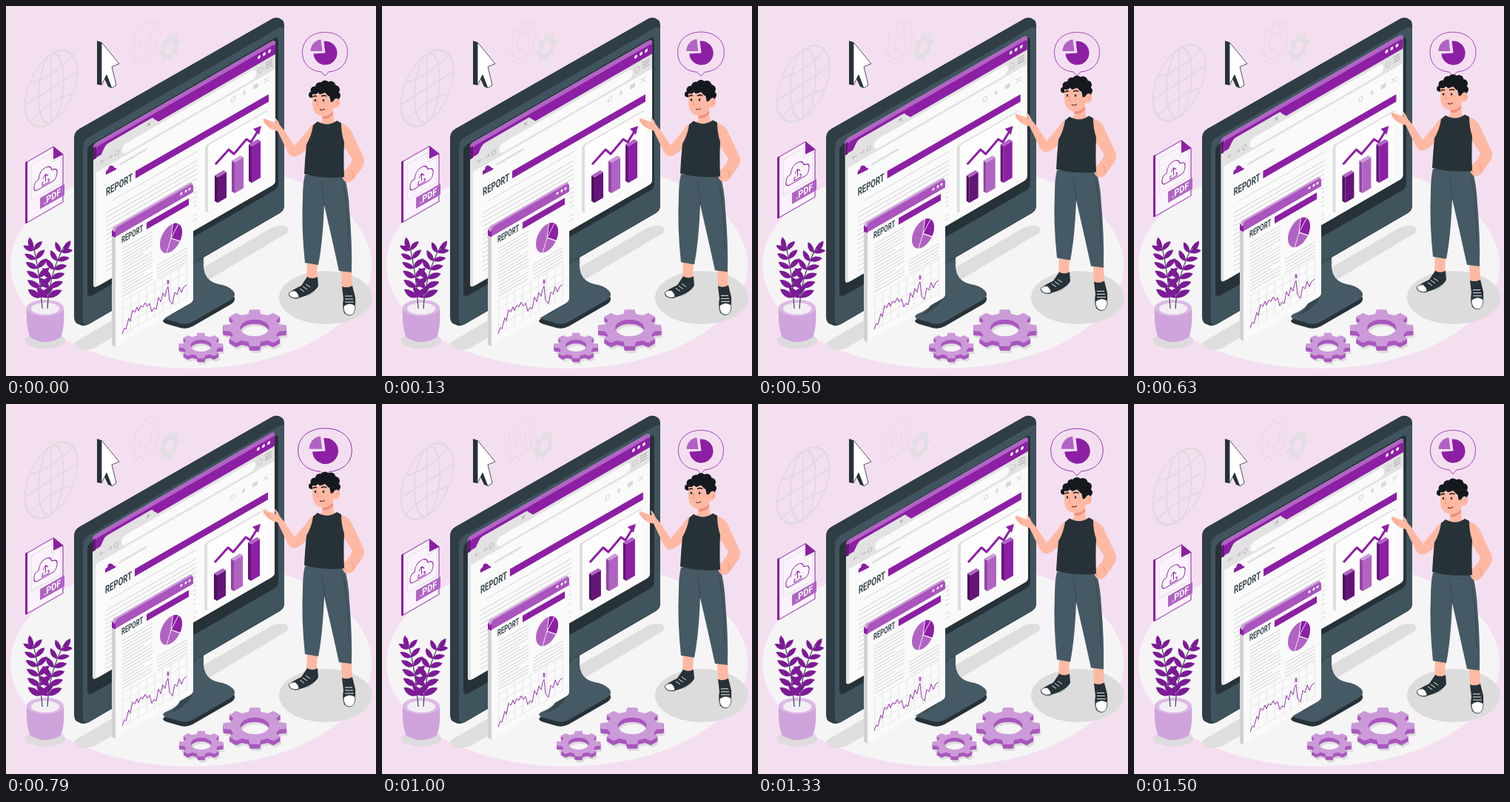
An HTML page with a canvas that plays this animation: 500x500 px, repeating every 1540 ms.

```html
<!DOCTYPE html>
<html lang="en">
<head>
<meta charset="utf-8">
<title>Report illustration</title>
<style>
html, body { margin: 0; width: 100%; height: 100%; overflow: hidden; background: #f4dff1; }
canvas { display: block; }
</style>
</head>
<body>
<canvas id="stage" width="500" height="500"></canvas>
<script>
const ctx = document.getElementById('stage').getContext('2d');
const LOOP = 1540, SLOPE = 0.577, TAU = Math.PI * 2;
const PURPLE = '#8c1fa4', MID = '#b163c4', LIGHT = '#cc9ad9', DEEP = '#651579';
const INK = '#263238', SLATE = '#37474f', STEEL = '#455a64';
const SKIN = '#ffb9a3', BLUSH = '#f08f7c', GREY = '#dcdcdc', PAPER = '#fafafa';

function fill(d, color) { ctx.fillStyle = color; ctx.fill(new Path2D(d)); }

function line(d, color, width = 1) {
  ctx.strokeStyle = color;
  ctx.lineWidth = width;
  ctx.stroke(new Path2D(d));
}

function oval(x, y, rx, ry, color, stroke) {
  ctx.beginPath();
  ctx.ellipse(x, y, rx, ry, 0, 0, TAU);
  if (color) { ctx.fillStyle = color; ctx.fill(); }
  if (stroke) { ctx.strokeStyle = stroke; ctx.stroke(); }
}

function box(x0, x1, y0, y1, color, r = 0) {
  ctx.fillStyle = color;
  ctx.beginPath();
  ctx.roundRect(x0, y0, x1 - x0, y1 - y0, r);
  ctx.fill();
}

function group(dx, dy, draw) {
  ctx.save();
  ctx.translate(dx, dy);
  draw();
  ctx.restore();
}

// Upright isometric wall whose heights are measured at x = x0.
function wall(x0, draw) {
  ctx.save();
  ctx.transform(1, -SLOPE, 0, 1, 0, SLOPE * x0);
  draw();
  ctx.restore();
}

function label(text, x, y, size, narrow, color) {
  ctx.save();
  ctx.translate(x, y);
  ctx.scale(narrow, 1);
  ctx.font = `bold ${size}px Roboto, sans-serif`;
  ctx.fillStyle = color;
  ctx.fillText(text, 0, 0);
  ctx.restore();
}

function textRows(x0, x1, from, to, step, color) {
  for (let y = from, i = 0; y <= to; y += step, i++)
    box(x0, i % 6 === 5 ? x1 - (x1 - x0) * 0.3 : x1, y, y + 1.2, color);
}

function slice(x, y, r, from, to, color) {
  ctx.fillStyle = color;
  ctx.beginPath();
  ctx.moveTo(x, y);
  ctx.arc(x, y, r, from * TAU, to * TAU);
  ctx.fill();
}

function gearPath(r, teeth, hole) {
  const path = new Path2D(), step = TAU / teeth;
  for (let i = 0; i < teeth; i++) {
    for (const [a, k] of [[-0.31, 0.79], [-0.2, 1], [0.2, 1], [0.31, 0.79]]) {
      const angle = (i + a) * step;
      path.lineTo(Math.cos(angle) * r * k, Math.sin(angle) * r * k);
    }
  }
  path.closePath();
  path.moveTo(hole, 0);
  path.arc(0, 0, hole, 0, TAU);
  return path;
}

const bigGear = gearPath(43, 8, 19.5), smallGear = gearPath(30, 8, 14);
const outlineGear = gearPath(21, 8, 8), paleGear = gearPath(15, 8, 6);

function floorGear(path, x, y, depth) {
  const layer = (dx, dy, color) => group(x + dx, y + dy, () => {
    ctx.scale(1, 0.58);
    ctx.fillStyle = color;
    ctx.fill(path, 'evenodd');
  });
  layer(2, depth + 3, GREY);
  for (let k = depth; k > 0; k--) layer(0, k, '#a957be');
  layer(0, 0, LIGHT);
}

function wallGears() {
  ctx.save();
  ctx.translate(189, 48);
  ctx.transform(0.95, -0.6, 0, 1.25, 0, 0);
  ctx.strokeStyle = '#e4d8e3';
  ctx.lineWidth = 1;
  ctx.stroke(outlineGear);
  ctx.restore();
  ctx.save();
  ctx.translate(221, 56);
  ctx.transform(0.95, -0.55, 0, 1.2, 0, 0);
  ctx.fillStyle = '#e3dee4';
  ctx.fill(paleGear, 'evenodd');
  ctx.restore();
}

function globe() {
  ctx.save();
  ctx.translate(61, 111.5);
  ctx.transform(1, -0.64, 0, 1.3, 0, 0);
  ctx.lineWidth = 2;
  const color = '#e0dadf';
  oval(0, 0, 35.5, 35.5, null, color);
  oval(0, 0, 17, 35.5, null, color);
  line('M0 -35V35M-35 0H35M-29 -20Q0 -11 29 -20M-29 20Q0 11 29 20', color, 1.8);
  ctx.restore();
}

function cursor() {
  const arrow = 'M129 49L153 78L143 82L149 107L143 111L136 93L129 107Z';
  fill('M123 47L129 49V107L123 106ZM131 94L136 92L143 111L138 109Z', INK);
  fill(arrow, '#fff');
  line(arrow, INK, 0.8);
}

function monitor() {
  const base = 'M216 416Q206 421 222 425L236 429Q244 431 252 427L304 397Q313 391 306 384Q300 378 288 376Q268 372 267 352V325L238 345V395Q236 408 216 416Z';
  group(0, 6, () => fill(base, INK));
  fill(base, STEEL);
  fill('M238 345L253 337V384Q252 405 222 418Q237 405 238 390Z', SLATE);
  fill('M92 178Q92 170 99 166L360 17Q367 14 372 18Q376 20 376 26V270Q376 276 370 280L112 430Q104 434 98 430Q92 428 92 420Z', '#2f3d45');
  fill('M104 190Q104 182 111 178L368 30Q376 26 376 32V268Q376 275 370 279L112 429Q104 433 104 424Z', '#40545e');
  fill('M110 196Q110 190 115 187L362 44Q368 40 368 47V240Q368 246 363 249L117 391Q110 394 110 388Z', INK);
}

function browser() {
  wall(118, () => {
    box(118, 364, 187, 382, '#e3e3e3', 5);
    box(122, 364, 200, 382, PAPER, 4);
    box(118, 364, 187, 200, MID, [4, 4, 0, 0]);
    box(122, 364, 193, 208, PURPLE, [3, 3, 0, 0]);
    box(118, 122, 192, 208, DEEP);
    box(122, 364, 207, 227, '#e2e2e2');
    fill('M128 208L133 200Q135 197 138 197H196Q199 197 200 200L207 208Z', '#e2e2e2');
    box(157, 338, 211, 224, PAPER, 6);
    for (const x of [342, 349, 356]) oval(x, 198.3, 2, 2.2, '#fff');
    line('M191 201L195 205M195 201L191 205', '#a8a8a8');
    line('M134 217H128L130 215M128 217L130 219M138 217H144L142 215M144 217L142 219', '#bbb');
    oval(150, 217, 2.6, 3, null, '#bbb');
    oval(344, 217, 3, 3.4, null, '#c4c4c4');
    line('M351 212H360M351 215.5H360M351 219H360', '#b0b0b0', 1.4);
  });
}

function bar(x, top, bottom, front, side, cap) {
  fill(`M${x} ${top}l4 2.5V${bottom}l-4 -2.5Z`, side);
  fill(`M${x + 4} ${top + 2.5}l12 -7V${bottom - 7}l-12 7Z`, front);
  fill(`M${x} ${top}l12 -7l4 2.5l-12 7Z`, cap);
}

function content() {
  fill('M135 228Q134 222 138 221Q139 214 144 216Q146 217 147 219Q150 218 149 221Z', PURPLE);
  wall(118, () => {
    box(153, 191, 233.5, 236.5, '#dedede', 1.5);
    box(175, 355, 256, 266, PURPLE);
    label('REPORT', 135, 266.5, 14.5, 0.66, SLATE);
    textRows(142, 258, 277, 282, 6, '#d9d9d9');
    textRows(135, 258, 289, 369, 6, '#d9d9d9');
    ctx.lineWidth = 1;
    oval(307, 235, 2.6, 3, null, '#d4d4d4');
    oval(322, 235, 1.8, 3, '#d9d9d9');
    box(334, 341, 232, 238, '#d9d9d9', 1);
    line('M349 232L355 238M355 232L349 238', '#d4d4d4');
    box(269, 354, 276, 368, '#dedede', 4);
    box(273, 354, 278, 368, '#fdfdfd', 3);
  });
  bar(282, 229, 266, DEEP, '#4f0f60', MID);
  bar(305, 209, 253, MID, '#9145a4', LIGHT);
  bar(328, 187, 239, PURPLE, DEEP, MID);
  line('M283 214L301 194L308 200L325 180L331 184L341 168', PURPLE, 3);
  fill('M334 166L345 162L342 174Z', PURPLE);
}

const TREND = 'M157 443L160 435L162 437L166 422L168 426L171 411L174 414L177 407L179 412L182 405L185 407L188 401L191 406L194 402L197 413L200 408L203 410L206 394L209 400L212 388L215 393L217 383L219 379L221 398L225 403L228 387L231 390L234 380L237 387L240 380L244 377';

function reportPage() {
  wall(148, () => {
    fill('M143 300Q143 295 148 296V461L143 455Z', '#d2d2d2');
    box(148, 253, 298, 460, PAPER, 4);
    fill('M143 300L148 304V313L143 308Z', PURPLE);
    box(145, 252, 297, 304, LIGHT, [4, 4, 0, 0]);
    box(148, 253, 300, 312, '#aa54be', [4, 4, 0, 0]);
    for (const x of [237, 243, 248]) oval(x, 305, 1.5, 1.8, '#fff');
    box(190, 247, 317, 326, PURPLE);
    label('REPORT', 156, 325.5, 12.5, 0.62, SLATE);
    textRows(157, 198, 333, 400, 4.6, '#d8d8d8');
    textRows(204, 245, 382, 401, 4.6, '#d8d8d8');
    ctx.save();
    ctx.translate(223, 357);
    ctx.scale(1, 1.22);
    slice(0, 0, 15, 0, 1, MID);
    slice(0, 0, 15, -0.22, 0.1, PURPLE);
    line('M0 0L2.5 -15M0 0L10 -11M0 0L12 9M0 0L-6 14', PAPER, 0.9);
    ctx.restore();
    for (let i = 0; i <= 8; i++) box(157 + i * 10.9, 157.7 + i * 10.9, 403, 450, '#dedede');
    for (let i = 0; i < 5; i++) box(157, 245, 404 + i * 11.3, 404.7 + i * 11.3, '#e0e0e0');
  });
  line(TREND, PURPLE, 0.9);
  box(217.5, 220.5, 370, 376, MID, 1);
}

function documentCard() {
  wall(28, () => {
    fill('M26 210L28 211H64L77 229V293H28L26 291Z', '#fbf3fb');
    line('M28 211H64L77 229V293H28Z', PURPLE, 1);
    box(26, 29, 210, 293, PURPLE);
    fill('M64 211L77 229L64 228Z', PURPLE);
    line('M34 218H62V231H74V266H34Z', '#dfd7e0', 0.8);
    fill('M46 270H79V285H46Z', MID);
    label('.PDF', 51, 281.5, 12.5, 0.866, '#fff');
    line('M42 257Q37 256 38 249Q39 243 44 244Q45 233 53 233Q60 233 62 241Q70 242 69 250Q68 257 64 257Z', PURPLE, 1);
    line('M51 251H49V255H58V251H56M53.5 252V242M50 246L53.5 242L57 246', PURPLE, 1);
  });
}

function leaf(x, y, angle, length) {
  ctx.save();
  ctx.translate(x, y);
  ctx.rotate(angle);
  ctx.scale(length, length);
  fill('M0 0C.25 -.34 .7 -.3 1 0C.7 .22 .25 .2 0 0Z', '#7d1a96');
  ctx.restore();
}

function branch(x0, y0, x1, y1, x2, y2) {
  line(`M${x0} ${y0}Q${x1} ${y1} ${x2} ${y2}`, SLATE, 1.2);
  for (let i = 0; i < 6; i++) {
    const t = 0.16 + i * 0.145, u = 1 - t;
    const x = u * u * x0 + 2 * u * t * x1 + t * t * x2;
    const y = u * u * y0 + 2 * u * t * y1 + t * t * y2;
    const dir = Math.atan2(u * (y1 - y0) + t * (y2 - y1), u * (x1 - x0) + t * (x2 - x1));
    leaf(x, y, dir - 0.95, 21 - i);
    leaf(x, y, dir + 0.95, 21 - i);
  }
  leaf(x2, y2 + 8, Math.atan2(y2 - y1, x2 - x1), 17);
}

function plant(sway) {
  oval(53, 452, 27, 11, GREY);
  fill('M28 408C27 425 29 440 33 448Q53 460 74 448C78 438 79 424 78 408Z', '#cfa3dc');
  oval(53, 408, 25, 11, '#dcb9e5');
  oval(53, 409, 19, 8, '#f3eef4');
  ctx.save();
  ctx.translate(53, 408);
  ctx.rotate(sway * 0.014);
  ctx.translate(-53, -408);
  branch(49, 409, 46, 360, 36, 321);
  branch(56, 409, 58, 362, 79, 324);
  ctx.restore();
}

function bubble(pulse) {
  ctx.save();
  ctx.translate(431, 63.5);
  ctx.save();
  ctx.scale(1 + 0.2 * pulse, 1 + 0.1 * pulse);
  line('M-5 25.5C-21 24 -30.5 14 -30.5 -1C-30.5 -17 -18 -28 0 -28C18 -28 30.5 -17 30.5 -1C30.5 14 21 24 5 25.5L0 31Z', PURPLE, 0.8);
  ctx.restore();
  ctx.scale(1 + 0.1 * pulse, 1 + 0.1 * pulse);
  slice(0.5, 0, 16, -0.27, 0.49, PURPLE);
  slice(-3.5, -2.5, 16, 0.5, 0.73, MID);
  ctx.restore();
}

function shoe(body, sole, laces) {
  fill(body, INK);
  fill(sole, '#fff');
  line(sole, INK, 0.7);
  line(laces, '#fff', 0.9);
}

const CURLS = [[413, 120, 4], [417, 114, 5.5], [424, 109, 6], [431, 107, 6.5], [439, 108, 6.5], [445, 113, 6], [447, 121, 5], [437, 115, 7], [427, 114, 6], [446, 128, 4]];

function man() {
  fill('M407 343L421 344L420 370L406 370Z', SKIN);
  fill('M453 355H467L468 383H454Z', SKIN);
  shoe('M407 366Q414 370 421 366L422 378Q420 385 409 391L397 395Q384 397 382 390Q383 385 399 378Z',
    'M382 388Q386 384 391 385Q396 389 396 394Q384 397 382 388Z',
    'M397 382L403 386M401 379L407 383M405 376L411 380M396 395Q413 391 422 380');
  shoe('M454 379Q461 382 468 378L472 394Q473 411 469 416Q463 421 457 415Q454 406 456 396Z',
    'M456 406Q464 399 472 405Q472 418 464 418Q456 417 456 406Z',
    'M458 392H468M458 396H469M458 400H470');
  fill('M404 228L457 229Q463 250 464 275Q468 320 467 360L450 358Q440 312 430 269Q428 320 422 350L404 347Q399 300 401 260Q401 240 404 228Z', STEEL);
  line('M426 239Q430 256 430 269M456 240Q464 290 463 330', SLATE, 0.9);
  fill('M450 158Q464 160 469 174L484 206Q485 213 480 220L470 234Q465 240 458 237Q453 233 455 226L465 214L468 207L455 188Z', SKIN);
  line('M455 228L459 234M466 222Q471 224 469 232', BLUSH, 0.9);
  fill('M420 158Q411 161 407 169L390 189L376 168L370 161Q368 155 364 151Q362 152 365 158L349 152Q346 153 349 156L347 156L351 160Q356 167 367 169L381 198Q386 206 393 203Q403 199 413 185Z', SKIN);
  line('M349 155L357 159M351 159L358 163', BLUSH, 0.7);
  fill('M427 142L442 139L443 156L455 160L437 175L415 161L427 156Z', SKIN);
  fill('M428 148Q436 149 441 142L442 146Q436 154 428 152Z', BLUSH);
  fill('M415 161L421 156Q435 164 447 155L453 158Q453 172 457 184Q456 206 457 231Q429 234 403 227Q404 206 406 187Q413 175 415 161Z', INK);
  for (const [x, y, r] of CURLS) oval(x, y, r, r, '#15191d');
  fill('M414 119Q424 121 431 117Q436 121 437 126L440 129Q443 122 448 125Q454 130 449 136Q446 139 443 137Q442 144 437 147Q429 151 421 147Q414 142 414 132Z', SKIN);
  fill('M441 119Q448 117 451 126Q446 122 442 129L439 130L437 122Z', '#15191d');
  line('M414.5 123Q417 120.5 420 122M426 122Q430 120 433 122', '#15191d', 1.5);
  oval(418, 127.5, 1.3, 1.8, INK);
  oval(429, 127.5, 1.3, 1.8, INK);
  line('M422 128L420 134L423 135', BLUSH, 1);
  line('M424 139.5Q427 142 431 139', '#702f32', 1.2);
  line('M446 130Q449 128 448 134', BLUSH, 0.8);
}

// Sideways drift of the screen: [time, offset], eased between stops.
const DRIFT = [[0, 0], [290, 2.4], [500, -0.3], [790, -1], [1000, -2.1], [1170, 1.6], [LOOP, 0]];

function drift(t) {
  const i = DRIFT.findIndex(stop => stop[0] > t);
  const [ta, a] = DRIFT[i - 1], [tb, b] = DRIFT[i];
  const p = (t - ta) / (tb - ta);
  return a + (b - a) * p * p * (3 - 2 * p);
}

function draw(t) {
  const angle = t / LOOP * TAU;
  const lift = -(1 - Math.cos(angle)) / 2, sway = Math.sin(angle);
  const pulse = Math.sin(angle * 1.5) ** 6;
  const shift = drift(t);

  ctx.fillStyle = '#f4dff1';
  ctx.fillRect(0, 0, 500, 500);
  oval(250, 350, 244, 140, '#f5f5f5');
  fill('M92 455L360 299Q384 292 381 306L120 462Q97 470 92 455Z', '#dedede');
  oval(432, 394, 63, 36, GREY);

  group(0, lift * 8.7, globe);
  group(sway * 2.8, 0, wallGears);
  cursor();
  monitor();
  group(shift, lift * 8.3, browser);
  group(shift, 0, content);
  group(0, lift * 8.5, reportPage);
  group(-sway * 2.6, 0, () => {
    floorGear(bigGear, 336, 435, 6);
    floorGear(smallGear, 263.5, 459, 5);
  });
  plant(sway);
  group(0, lift * 9.3, documentCard);
  bubble(pulse);
  group(0, lift * 9, man);
}

const start = performance.now();

function tick() {
  draw((performance.now() - start) % LOOP);
  requestAnimationFrame(tick);
}

ctx.lineJoin = 'round';
tick();
</script>
</body>
</html>
```
